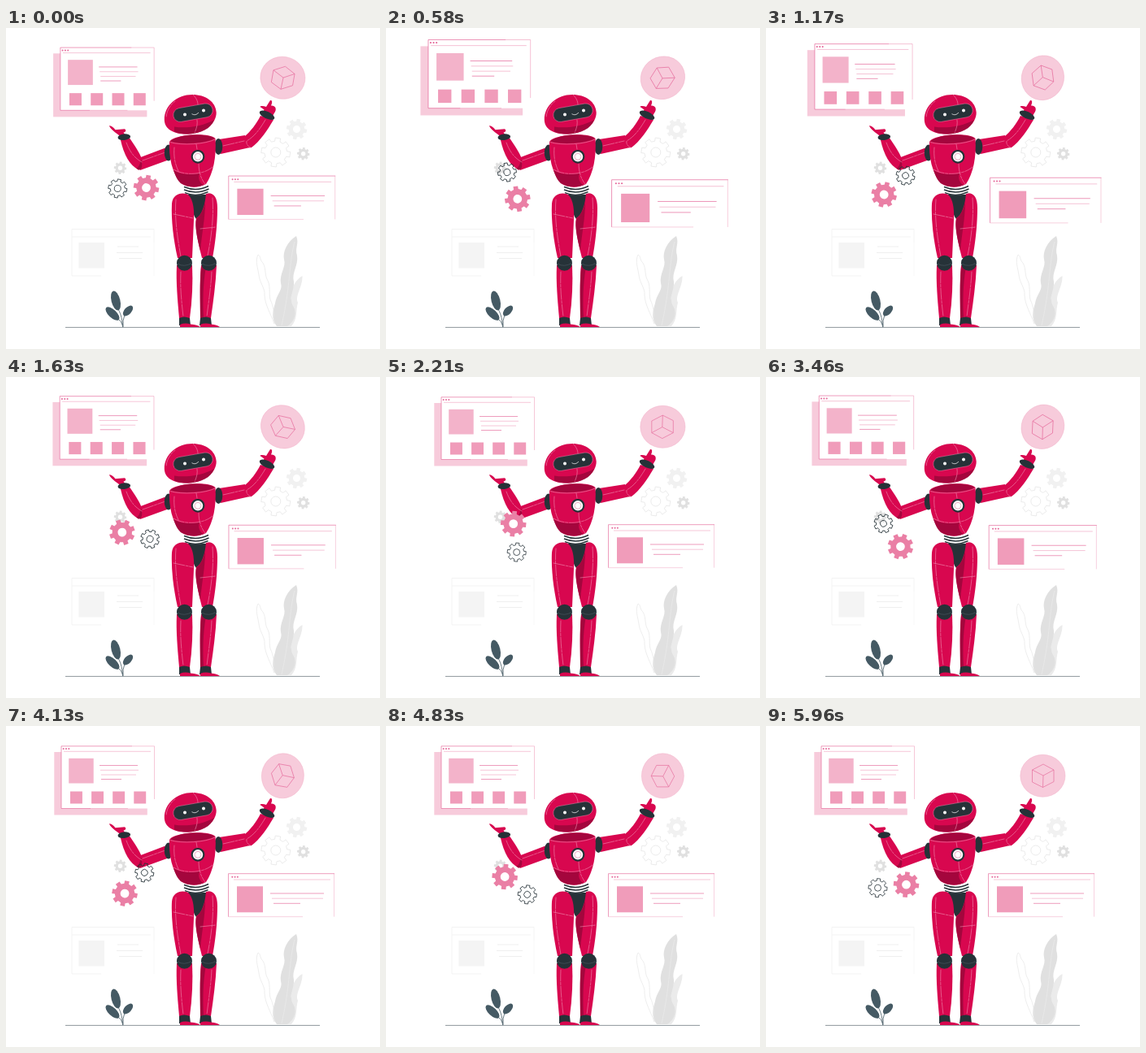
An HTML page that plays this animation: 460x395 px, repeating every 6 s.

```html
<!DOCTYPE html>
<html lang="en">
<head>
<meta charset="utf-8">
<title>Robot with floating panels</title>
<style>
html, body { margin: 0; width: 100%; height: 100%; overflow: hidden; background: #fff; }
svg { display: block; width: 460px; height: 395px; }
.main { fill: #d8074f; }
.shade { fill: #a4063d; }
.dark { fill: #263238; }
.seam { fill: none; stroke: #f39dbb; stroke-width: .55; stroke-linecap: round; }
.dash { stroke-dasharray: 14 1.500 3 1.500; }
.rim { fill: none; stroke: #e5689a; stroke-width: .65; }
.thin { fill: none; stroke: #ee98b8; stroke-width: .55; }
.tile { fill: #f09cba; }
</style>
</head>
<body>
<svg viewBox="0 0 460 395">
  <!-- faint backdrop -->
  <g fill="none" stroke="#f0f0f0" stroke-width=".8">
    <path d="M117 305H81V247.500H182V264M81 257H178"/>
    <path d="M182 264V305" stroke="#f8f8f8"/>
    <path d="M137 269H163M136 276.500H168M139 283.500H167" stroke="#ebebeb"/>
    <rect x="89.500" y="264" width="31.500" height="31.500" fill="#f4f4f4" stroke="none"/>
  </g>
  <g id="still"></g>

  <!-- plants -->
  <path d="M364.500 305C356 310 350 320 351 332C346 342 342 352 343 367H351C359 358 356 348 359 338C355 329 365 319 364.500 305Z" fill="#ebebeb"/>
  <path d="M357 256C346 263 340 275 342 285C345 293 336 303 338 314C341 322 332 329 331 339C328 348 326 358 333 367H346C356 360 358 350 353 342C347 331 355 322 354 312C351 301 360 292 358 280C355 270 361 265 357 256Z" fill="#e0e0e0"/>
  <path d="M355 263C348 288 350 318 339 366" fill="none" stroke="#ededed" stroke-width=".6"/>
  <path d="M310 279C306 287 310 296 311 304C312 314 319 320 318 329C319 342 325 350 330 364C330 349 329 343 325 334C323 326 326 317 321 309C318 303 320 293 315 288C312 284 313 280 310 279Z" fill="none" stroke="#e6e6e6" stroke-width=".7"/>
  <g fill="#455a64">
    <ellipse cx="135" cy="335.500" rx="5.400" ry="12.200" transform="rotate(-14 135 335.500)"/>
    <ellipse cx="131" cy="351.500" rx="5" ry="10.800" transform="rotate(-46 131 351.500)"/>
    <ellipse cx="150" cy="348" rx="4.300" ry="7.800" transform="rotate(43 150 348)"/>
    <path d="M138 346C142 353 143 360 143.500 368M138 358Q142 361 143.500 366M146 353Q143 360 144 368" fill="none" stroke="#455a64" stroke-width=".8"/>
  </g>
  <path d="M73 368.400H386" stroke="#5d6b73" stroke-width=".7"/>

  <!-- floating panels -->
  <g id="panels">
    <rect x="59.300" y="32" width="114.500" height="77.500" fill="#f7cbdb"/>
    <rect x="68" y="24.800" width="114.500" height="76.700" fill="#fff"/>
    <path class="rim" d="M155 24.800H68V101.500H104"/>
    <path class="thin" d="M155 24.800H182.500V90M104 101.500H150"/>
    <path class="thin" d="M71 31.300H178"/>
    <rect x="77.200" y="39.800" width="30.500" height="30.700" fill="#f3b3ca"/>
    <path class="rim" d="M115 48.500H162M117 65.500H142"/>
    <path class="thin" d="M116 54.300H163M117 60H160"/>
    <g id="tiles" class="tile"></g>

    <rect x="273.500" y="181.700" width="130" height="53" fill="#fff"/>
    <path class="rim" d="M404 181.700H273.500V234.700"/>
    <path class="thin" d="M273.500 234.700H365M403.500 181.700V234.700" opacity=".8"/>
    <path class="thin" d="M280 189H399"/>
    <rect class="tile" x="284" y="197.300" width="32" height="32"/>
    <path class="rim" d="M325 206H391M329 218.300H362"/>
    <path class="thin" d="M327 212.200H390"/>
    <g id="dots" fill="#e5689a"></g>
  </g>

  <!-- cube badge -->
  <g id="badge">
    <ellipse cx="340.400" cy="61.300" rx="27.600" ry="26" fill="#f7cbdb" stroke="#f0a5c0" stroke-width=".4"/>
    <path class="rim" d="M327.500 54L341 47L354 54V68.500L340.500 75.500L327.500 69ZL341 61L354 54M341 61L340.500 75.500"/>
  </g>

  <!-- left arm -->
  <path class="main" d="M139 132C135 129 129 125 127 120.500C129 119.700 132 122.500 134.500 125.200L146 124.300C148.500 126 147 128 144.500 128.700L148 133Z"/>
  <path class="main" d="M163 160L196 147.500C199 151 199 159 198 163L165 175Z"/>
  <path class="main" d="M141 138L152 135.500C158 144 164 153 167 161C169 168 168 174 163 174.500C152 169 145 156 141 138Z"/>
  <path class="shade" d="M163 174.500C168 175 168 167 166 161C165 168 163 172 160 172.500Z"/>
  <path class="seam dash" d="M148 141C152 152 158 160 167 165M168 163L196 153"/>
  <ellipse class="dark" cx="145.300" cy="134.200" rx="7.800" ry="3.800" transform="rotate(-6 145.300 134.200)"/>

  <!-- right arm -->
  <path class="main" d="M316 104L317.500 100.500L312.500 97C313 95.500 316.500 96 320 97L325 89C328 88.500 327.500 92 326 95.500C331 95 333 99 331 103L328 108Z"/>
  <path class="main" d="M262 137L294 132L300 147L264 155C265 149 264 142 262 137Z"/>
  <path class="main" d="M313 108L329 113C322 125 312 140 302 147C295 149 291 142 293 134C301 127 308 118 313 108Z"/>
  <path class="seam dash" d="M319 113C312 125 305 134 296 139C295 143 298 146 301 147M267 145L293 139"/>
  <ellipse class="dark" cx="321" cy="107.200" rx="10" ry="4.300" transform="rotate(25 321 107.200)"/>

  <!-- pelvis -->
  <path class="dark" d="M219 205H248C247 220 244 232 237 236C232 236 230 228 229 220C228 212 225 207 219 205Z"/>

  <!-- legs -->
  <path class="main" d="M204 216C205 205 214 202 222 204C229 207 232 220 231 236L229 283H211C206 260 203 237 204 216Z"/>
  <path class="main" d="M246 203.500C256 202 260 209 260 221C260 245 257 267 254 283H241C236 263 232 245 234 234C241 230 245 217 246 203.500Z"/>
  <path class="shade" d="M234 235C239 231 243 224 245 214C245 234 241 252 239 274C235 258 232 244 234 235Z"/>
  <path class="main" d="M210 292H229C230 314 229 335 226 357H213C211 335 209 313 210 292Z"/>
  <path class="main" d="M240 292H259C258 315 255 336 252 357H239C239 335 238 313 240 292Z"/>
  <path class="shade" d="M240 294H246C242 316 242 337 243 357H239C239 335 238 314 240 294Z"/>
  <path class="seam dash" d="M209 211C207 234 211 259 215 281M215 300C214 320 216 338 218 355M254 209C256 234 252 260 248 280M253 300C252 320 249 338 247 355M206 229L230 234M239 247L258 245"/>
  <circle class="dark" cx="219.500" cy="289.200" r="9.500"/>
  <circle class="dark" cx="249.500" cy="289.200" r="9.500"/>
  <path d="M211 290Q219 295 229 289M241 290Q249 295 259 289" fill="none" stroke="#53606a" stroke-width=".5"/>
  <path class="dark" d="M213 357Q219 354 226 357L227 366H213ZM239 357Q246 354 252 357L253 366H238Z"/>
  <path class="main" d="M214 368V365Q220 362.500 227 364.500Q236 365 239 368ZM239 368V365Q245 362.500 252 364.500Q260 365 263 368Z"/>

  <!-- waist -->
  <path d="M218 192H250V203Q234 208 219 203Z" fill="#fff"/>
  <path d="M219 195.500Q234 202 249 194.500M219 199Q234 205.500 249.500 198M220 202.700Q234 208.500 248.500 201.700" fill="none" stroke="#263238" stroke-width="1.400"/>

  <!-- torso -->
  <ellipse class="dark" cx="199.800" cy="153.500" rx="5" ry="10"/>
  <ellipse class="dark" cx="261.300" cy="146" rx="5" ry="10"/>
  <path class="main" d="M201 140C206 131 249 128 257.500 136C259 158 255 179 246 192C237 197 224 197 215 191C204 179 200 157 201 140Z"/>
  <path class="shade" d="M202 139.500C211 130 248 129 257 136C246 142 216 144 202 139.500Z"/>
  <path class="shade" d="M206 175C214 180.500 228 181 238 179C236 185 238 191 243 193.300C236 196 224 197 215 191C210 187 208 180 206 175Z"/>
  <path class="seam" d="M202 140.500C216 145 246 143 257 137"/>
  <path class="seam dash" d="M234 143L235 149M237 167C237 177 240 186 245 192M206 174C219 182 243 181 254 171M207 147C206 158 208 168 212 176"/>
  <circle cx="236" cy="158.300" r="7.300" fill="#fff" stroke="#263238" stroke-width="2.200"/>
  <circle cx="236" cy="158.300" r="4" fill="#fff" stroke="#e88aac" stroke-width=".7"/>

  <!-- head -->
  <path class="main" d="M194.800 113C194.500 95 211 82 229 82C246 82 258 91 258.700 104C259 118 243 129.500 224 130.500C207 131 195 125 194.800 113Z"/>
  <path class="shade" d="M207 121.500C222 124 242 121 256 113C252 124 240 129.700 224 130.500C217 130.700 211 129.500 207 127.500Z"/>
  <path class="seam dash" d="M230 82C234 86 236 90 236 94M235 113C236 119 234 124 232 129M197 109C198 101 202 95 208 90"/>
  <rect class="dark" x="205.500" y="95.700" width="49" height="17" rx="8.500" transform="rotate(-10 230 104.200)" stroke="#ef7fa8" stroke-width=".5"/>
  <circle cx="220" cy="106.500" r="2" fill="#fff"/>
  <circle cx="243" cy="101.500" r="2" fill="#fff"/>
  <path d="M228.500 105.700Q233 108.500 237 104" fill="none" stroke="#fff" stroke-width=".7"/>

  <g id="orbit"></g>
</svg>
<script>
const $ = id => document.getElementById(id);
const TAU = Math.PI * 2;

function add(parent, name, attrs) {
  const el = document.createElementNS("http://www.w3.org/2000/svg", name);
  for (const key in attrs) el.setAttribute(key, attrs[key]);
  parent.appendChild(el);
}

function ring(x, y, r) {
  return `M${x - r} ${y}a${r} ${r} 0 1 0 ${2 * r} 0a${r} ${r} 0 1 0 ${-2 * r} 0Z`;
}

function gear(parent, x, y, r, hole, paint, turn = 0) {
  const root = r * 0.77;
  const corners = [[-0.3, root], [-0.23, r], [0.23, r], [0.3, root]];
  const points = [];
  for (let tooth = 0; tooth < 8; tooth++) {
    for (const [offset, radius] of corners) {
      const a = (tooth + offset) / 8 * TAU + turn;
      points.push((x + radius * Math.cos(a)).toFixed(2) + " " + (y + radius * Math.sin(a)).toFixed(2));
    }
  }
  add(parent, "path", {
    d: "M" + points.join("L") + "Z" + ring(x, y, hole),
    "fill-rule": "evenodd", "stroke-linejoin": "round", ...paint
  });
}

const filled = fill => ({ fill });
const outlined = (stroke, width) => ({ fill: "none", stroke, "stroke-width": width });

gear($("still"), 357.500, 124.500, 12.800, 4.500, filled("#f1f1f1"), 0.2);
gear($("still"), 365.700, 154.800, 7.800, 2.700, filled("#e0e0e0"), 0.1);
gear($("still"), 331.800, 153, 18, 6, outlined("#e2e2e2", 0.7), 0.15);
gear($("still"), 140.500, 172.300, 7.800, 2.700, filled("#e0e0e0"), 0.1);
gear($("orbit"), 172.500, 195.200, 15.900, 5.400, filled("#ea7fa5"), 0.1);
gear($("orbit"), 137.500, 199.200, 11.600, 4, outlined("#263238", 0.8), 0.1);

for (let i = 0; i < 4; i++) {
  add($("tiles"), "rect", { x: 79 + 26.1 * i, y: 80.5, width: 14.9, height: 15 });
}
for (const [x, y] of [[70.7, 28.1], [278.3, 185.8]]) {
  for (let i = 0; i < 3; i++) add($("dots"), "circle", { cx: x + 3.3 * i, cy: y, r: 1 });
}

const LOOP = 6000, FPS = 24;
// [time, scale] of the double pulse
const pulse = [[0, 1], [600, 1.1], [1800, 1], [2400, 1], [3000, 1.1], [3600, 1], [6000, 1]];

function pulseAt(t) {
  const i = pulse.findIndex(step => t <= step[0]);
  if (i < 1) return 1;
  const [t0, s0] = pulse[i - 1], [t1, s1] = pulse[i];
  return s0 + (s1 - s0) * (t - t0) / (t1 - t0);
}

function draw(now) {
  const step = Math.floor((now % LOOP + 5) * FPS / 1000);
  const t = (step + 1) * 1000 / FPS % LOOP;
  const s = pulseAt(t);
  $("panels").setAttribute("transform", `translate(231.700 130) scale(${s}) translate(-231.700 -130)`);
  $("orbit").setAttribute("transform", `rotate(${t / 3000 * 360} 157.300 195.800)`);
  $("badge").setAttribute("transform", `rotate(${t / 1500 * 360} 340.400 61.300)`);
}

const start = performance.now();
function tick() {
  draw(performance.now() - start);
  requestAnimationFrame(tick);
}
tick();
</script>
</body>
</html>
```
